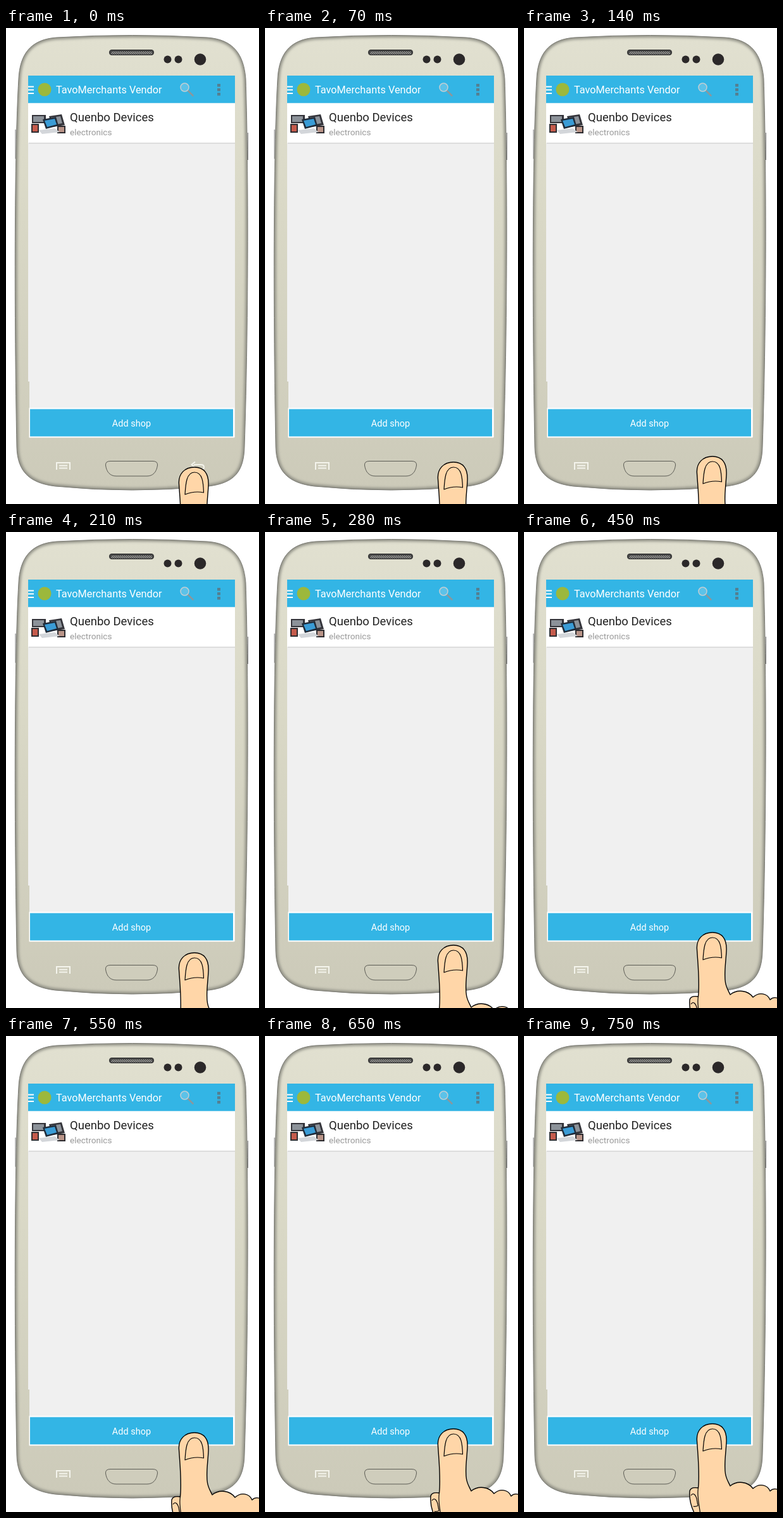
Recreate the animation shown at these times as an HTML page. Size 400x750 px, loop 2250 ms.

```html
<!DOCTYPE html>
<html lang="en">
<head>
<meta charset="utf-8">
<title>Shop list</title>
<style>
  html, body { margin: 0; width: 100%; height: 100%; overflow: hidden; background: #fff; }
  svg { display: block; width: 400px; height: 750px; }
  text { font-family: Roboto, "Open Sans", sans-serif; }
</style>
</head>
<body>
<svg viewBox="0 0 400 750">
  <defs>
    <path id="body" d="M20 80C22 42 38 18 80 15Q200 8 318 15C360 18 376 42 379 80C383 200 384 450 377 660C376 698 362 717 320 722Q200 734 78 722C36 717 18 698 17 660C13 450 13 200 20 80Z"/>
    <clipPath id="inside"><use href="#body"/></clipPath>
    <linearGradient id="shell" x2="0" y2="1">
      <stop stop-color="#e1e0d0"/>
      <stop offset=".4" stop-color="#d9d8c6"/>
      <stop offset="1" stop-color="#cccab9"/>
    </linearGradient>
    <filter id="soft"><feGaussianBlur stdDeviation="2"/></filter>
    <pattern id="mesh" width="3" height="3" patternUnits="userSpaceOnUse">
      <path d="M0 3L3 0" stroke="#d0d0cc"/>
    </pattern>
  </defs>

  <!-- Phone -->
  <path d="M15 160V206M382.500 165V208" stroke="#777"/>
  <g clip-path="url(#inside)" fill="none">
    <use href="#body" fill="url(#shell)"/>
    <use href="#body" stroke="#8a8a80" stroke-width="6" filter="url(#soft)"/>
  </g>
  <use href="#body" fill="none" stroke="#7a7a73"/>
  <rect x="163.500" y="34.500" width="70" height="8" rx="3.500" fill="#444" stroke="#333"/>
  <rect x="166" y="37" width="65" height="4.500" rx="2" fill="url(#mesh)"/>
  <g fill="#2b2829">
    <circle cx="255.500" cy="49.500" r="6"/>
    <circle cx="272.500" cy="49.500" r="6"/>
    <circle cx="307" cy="49.500" r="9.300"/>
  </g>
  <path d="M165 682.500H232Q240 682.500 239.500 689C238 700 232 706 223 706H174C165 706 159 700 157.500 689Q157 682.500 165 682.500Z" fill="#cfcdbc" stroke="#5c5c55"/>
  <g fill="none" stroke="#f4f4ec" stroke-width="2">
    <path d="M80 696V685H101V696M84 689.500H97M84 693.500H97"/>
    <path d="M297 688H308Q313 688 313 692T308 696H303M299 683.500L293.500 688L299 692.500"/>
  </g>

  <!-- Screen -->
  <path d="M35 75H362V645H37V557H35Z" fill="#f0f0f0"/>
  <path d="M35 75H362V118.500H35Z" fill="#33b5e5"/>
  <path d="M35 118.500H362V181H35Z" fill="#fff"/>
  <path d="M36 181.500H362" stroke="#d4d4d4" stroke-width="1.500"/>
  <path d="M36.500 598.500H361V645.500H36.500Z" fill="#fff"/>
  <path d="M38 600.500H359V643.500H38Z" fill="#33b5e5"/>
  <path d="M35 92.500H44M35 97.500H44M35 103H44" stroke="#fff" stroke-width="2"/>
  <circle cx="61" cy="97" r="10.500" fill="#9cb83c"/>
  <path d="M288 99L295.500 106.500" stroke="#8a979d" stroke-width="2.500" stroke-linecap="round"/>
  <circle cx="282.500" cy="93.500" r="6.500" fill="#5cc2e8" stroke="#c2ced3" stroke-width="1.500"/>
  <path d="M334 88h5v4.500h-5zM334 95h5v4.500h-5zM334 102h5v4.500h-5z" fill="#547f91"/>
  <text x="79" y="103" font-size="16.300" fill="#fff">TavoMerchants Vendor</text>
  <text x="101" y="147" font-size="18.500" fill="#222">Quenbo Devices</text>
  <text x="101" y="168.500" font-size="13.600" fill="#999">electronics</text>
  <text x="198.500" y="627.500" font-size="14.500" fill="#fff" text-anchor="middle">Add shop</text>

  <!-- Gadget picture -->
  <path d="M41 137H63V150H41ZM68 139L88 136L93 153L73 156Z" fill="#34343a"/>
  <path d="M43 139H60V148H43ZM71 141L86 139L89 150L75 153Z" fill="#8c9299"/>
  <path d="M40 151H52V165H40ZM81 154H94V166H81Z" fill="#2d2c30"/>
  <path d="M42 153H50V163H42Z" fill="#c55b4c"/>
  <path d="M83 156H92V164H83Z" fill="#b99488"/>
  <path d="M52 161L77 158L85 164L57 167Z" fill="#d3d6da"/>
  <path d="M58 144L79 140L83 154L63 159Z" fill="#202c3a"/>
  <path d="M61 146L77 143L80 152L65 156Z" fill="#3a9cd6"/>

  <!-- Hand -->
  <g id="hand" fill="#ffd6a8" stroke="#000" stroke-width="1.400" stroke-linejoin="round">
    <path d="M271 755C264 742 261 729 262 717C263 712 269 711 275.500 712C278 688 275 662 273.500 638C272 621 283 611 298 611C313 611 321 621 320 640C319 660 316 676 318.500 690C320 699 324 704 326 709C337 700 354 702 362 713C372 704 385 707 389 717C394 712 399 713 405 716V755Z"/>
    <path d="M283 654C284 638 285 619 298 619C311 619 312 636 312.500 651C303 649 293 650 283 654Z" stroke-width="1.200"/>
    <path d="M275.500 712C273 724 277 738 279 755M264 724C267 719 271 722 273 729L275 740Q271 742 267.500 741" fill="none" stroke-width="1.200"/>
  </g>
</svg>
<script>
  const hand = document.getElementById("hand");
  const LOOP = 2250;
  const starts = [0, 70, 140, 210, 280, 350, 450, 550, 650, 750];
  const drops = [81, 73, 64, 52, 40, 30, 20, 14, 8, 0];

  function draw() {
    const t = performance.now() % LOOP;
    const step = starts.findLastIndex(start => start <= t);
    hand.setAttribute("transform", `translate(0 ${drops[step]})`);
    requestAnimationFrame(draw);
  }
  draw();
</script>
</body>
</html>
```
